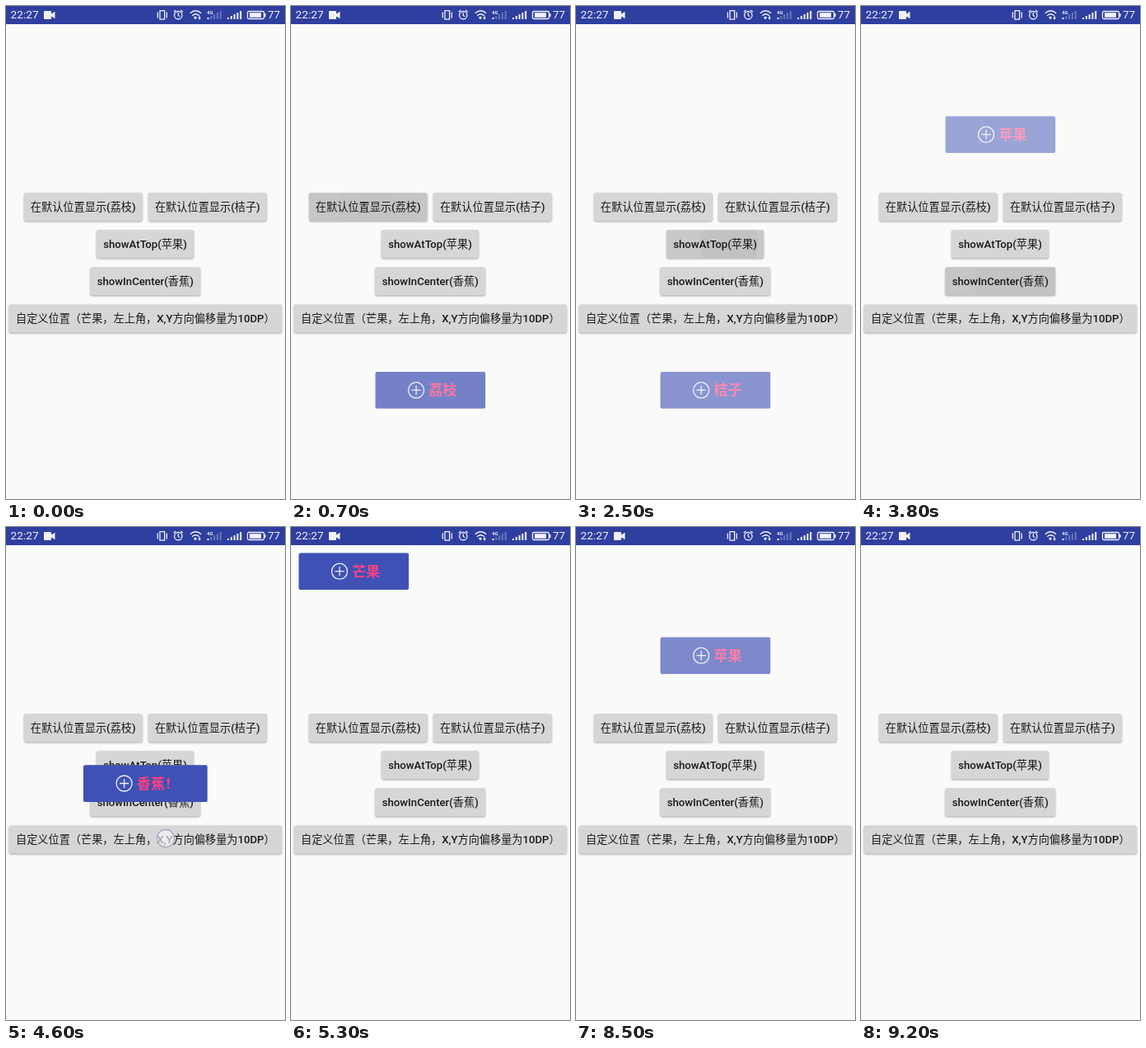
Write an HTML page that moves like this. It is 339 by 597 pixels and loops after 9300 ms.

```html
<!DOCTYPE html>
<html lang="zh-CN">
<head>
<meta charset="utf-8">
<style>
  html, body { margin: 0; width: 100%; height: 100%; overflow: hidden; background: #fafaf9; }
  svg { display: block; width: 100vw; height: 100vh; font-family: Roboto, "Noto Sans CJK SC", "Noto Sans CJK", sans-serif; }
  .face { fill: #d6d6d6; filter: drop-shadow(0 1px 1px rgba(0, 0, 0, .34)); }
  .label { font-size: 13.18px; font-weight: 500; fill: #1a1a1a; text-anchor: middle; }
  .fruit { font-size: 16.95px; font-weight: 700; fill: #ff4081; }
  .bar { font-size: 13.7px; fill: #f0f1fa; }
  .line { fill: none; stroke: #f0f1fa; stroke-width: 1.3; }
  .fill { fill: #f0f1fa; }
</style>
</head>
<body>
<svg id="stage" viewBox="0 0 339 597">
  <rect width="339" height="22" fill="#2f3f9f"/>
  <g class="bar">
    <text x="5.5" y="15.4">22:27</text>
    <text x="318" y="15.4" font-size="13.4">77</text>
  </g>
  <path class="fill" d="M46 7q0-1 1-1h7q1 0 1 1v2.5l4.500-2.700v8.400l-4.500-2.700v2.500q0 1-1 1h-7q-1 0-1-1z"/>
  <path class="line" d="M187 5.700h5.600v10.400h-5.600zM184.300 7.500v7M195.300 7.500v7"/>
  <g class="line">
    <circle cx="209.300" cy="11.200" r="4.700"/>
    <path d="M209.300 8.300v3.200l2 1.200M203.800 7.300l2.600-2.400M214.800 7.300l-2.600-2.400"/>
  </g>
  <g class="line" stroke-width="1.500">
    <path d="M223.800 8.800q6.700-6 13.400 0M226.200 11.700q4.300-4 8.600 0"/>
  </g>
  <path class="fill" d="M228 13.700q2.500-2 4 0l-2 2.700z"/>
  <path class="fill" id="arrow" d="M233.300 14h1.200v-2h1.200v2h1.200l-1.800 2.700z"/>
  <text class="fill" x="244" y="9.500" font-size="6" font-weight="700">4G</text>
  <g id="signal" class="fill"></g>
  <rect class="line" x="293.500" y="6.500" width="20" height="9" rx="1.500"/>
  <path class="fill" d="M296 8.300h14v5.400h-14zM314 9h1.600v4h-1.600z"/>
  <g id="buttons"></g>
  <g id="toasts"></g>
  <circle id="dot" r="10.500" fill="rgba(250,250,255,.62)" stroke="#a9adc4" stroke-width="1.300"/>
</svg>
<script>
const LOOP = 9300;
const $ = id => document.getElementById(id);
const clamp = v => Math.max(0, Math.min(1, v));

function add(parent, tag, attrs, text) {
  const el = document.createElementNS('http://www.w3.org/2000/svg', tag);
  for (const k in attrs) el.setAttribute(k, attrs[k]);
  if (text) el.textContent = text;
  return parent.appendChild(el);
}

for (let i = 0; i < 5; i++) {
  const height = 2 + 2 * i;
  const bar = { y: 16 - height, width: 2, height };
  add($('signal'), 'rect', { ...bar, x: 244.5 + 3.8 * i, opacity: i ? .3 : 1 });
  add($('signal'), 'rect', { ...bar, x: 269 + 3.8 * i });
}

// x, y, width, label
const buttons = [
  [22, 226.2, 143.5, '在默认位置显示(荔枝)'],
  [173, 226.2, 143.7, '在默认位置显示(桔子)'],
  [110, 271.2, 118, 'showAtTop(苹果)'],
  [102.5, 316.3, 133.5, 'showInCenter(香蕉)'],
  [3.7, 361.4, 331.3, '自定义位置（芒果，左上角，X,Y方向偏移量为10DP）']
].map(([x, y, width, label], i) => {
  const box = { x, y, width, height: 34, rx: 2 }, g = add($('buttons'), 'g', {});
  add(add(g, 'clipPath', { id: 'clip' + i }), 'rect', box);
  add(g, 'rect', { ...box, class: 'face' });
  const shade = add(g, 'rect', { ...box, opacity: 0 });
  const wave = add(add(g, 'g', { 'clip-path': `url(#clip${i})` }), 'circle', { opacity: 0 });
  add(g, 'text', { class: 'label', x: x + width / 2, y: y + 22 }, label);
  return { shade, wave };
});

// text, x, y, width, fade-in start and end, fade-out start and end
const toasts = [
  ['荔枝', 102.5, 443, 133.7, 450, 800, 1320, 1620],
  ['桔子', 102.5, 443, 133.7, 1600, 1900, 2380, 2680],
  ['苹果', 102.5, 133.5, 133.7, 2650, 2900, 3650, 3950],
  ['香蕉！', 94, 288.3, 150.7, 3900, 4200, 4650, 4950],
  ['芒果', 9.4, 31.5, 133.7, 4950, 5300, 6400, 6700],
  ['苹果', 102.5, 133.5, 133.7, 6650, 7050, 8400, 8700]
].map(([text, x, y, width, ...times]) => {
  const g = add($('toasts'), 'g', { transform: `translate(${x} ${y})` });
  add(g, 'rect', { width, height: 44.6, rx: 2, fill: '#3f51b5' });
  const icon = add(g, 'g', { class: 'line', 'stroke-width': 1.2 });
  add(icon, 'circle', { cx: 49.6, cy: 22.2, r: 9.5 });
  add(icon, 'path', { d: 'M44 22.2h11.2M49.600 16.600v11.200' });
  add(g, 'text', { class: 'fruit', x: 65, y: 28.4 }, text);
  return { g, times };
});

// time, button, touch point
const taps = [
  [400, 0, 105, 244], [1300, 1, 260, 243], [2300, 2, 186, 288],
  [3500, 3, 188, 335], [4600, 4, 194, 377], [6400, 2, 170, 288]
];
const idle = [[3200, 3500], [5900, 6400], [7800, 8500]];

function draw(t) {
  for (const { g, times: [a, b, c, d] } of toasts)
    g.setAttribute('opacity', Math.min(clamp((t - a) / (b - a)), clamp((d - t) / (d - c))));

  for (const { shade, wave } of buttons) {
    shade.setAttribute('opacity', 0);
    wave.setAttribute('opacity', 0);
  }
  $('dot').setAttribute('opacity', 0);
  for (const [start, i, x, y] of taps) {
    const dt = t - start;
    if (dt < 0 || dt >= 700) continue;
    const { shade, wave } = buttons[i];
    shade.setAttribute('opacity', .075 * Math.min(clamp(dt / 250), clamp((700 - dt) / 300)));
    wave.setAttribute('opacity', .035 * Math.min(clamp(dt / 100), clamp((400 - dt) / 200)));
    wave.setAttribute('cx', x);
    wave.setAttribute('cy', y);
    wave.setAttribute('r', 8 + .14 * dt);
    $('dot').setAttribute('cx', x);
    $('dot').setAttribute('cy', y);
    $('dot').setAttribute('opacity', clamp(1 - dt / 150));
  }
  $('arrow').setAttribute('opacity', idle.some(([a, b]) => t >= a && t < b) ? .5 : 1);
}

const begin = performance.now();
function tick() {
  const t = (performance.now() - begin) % LOOP;
  draw(Math.floor(t / 100) * 100);
  requestAnimationFrame(tick);
}
tick();
</script>
</body>
</html>
```
